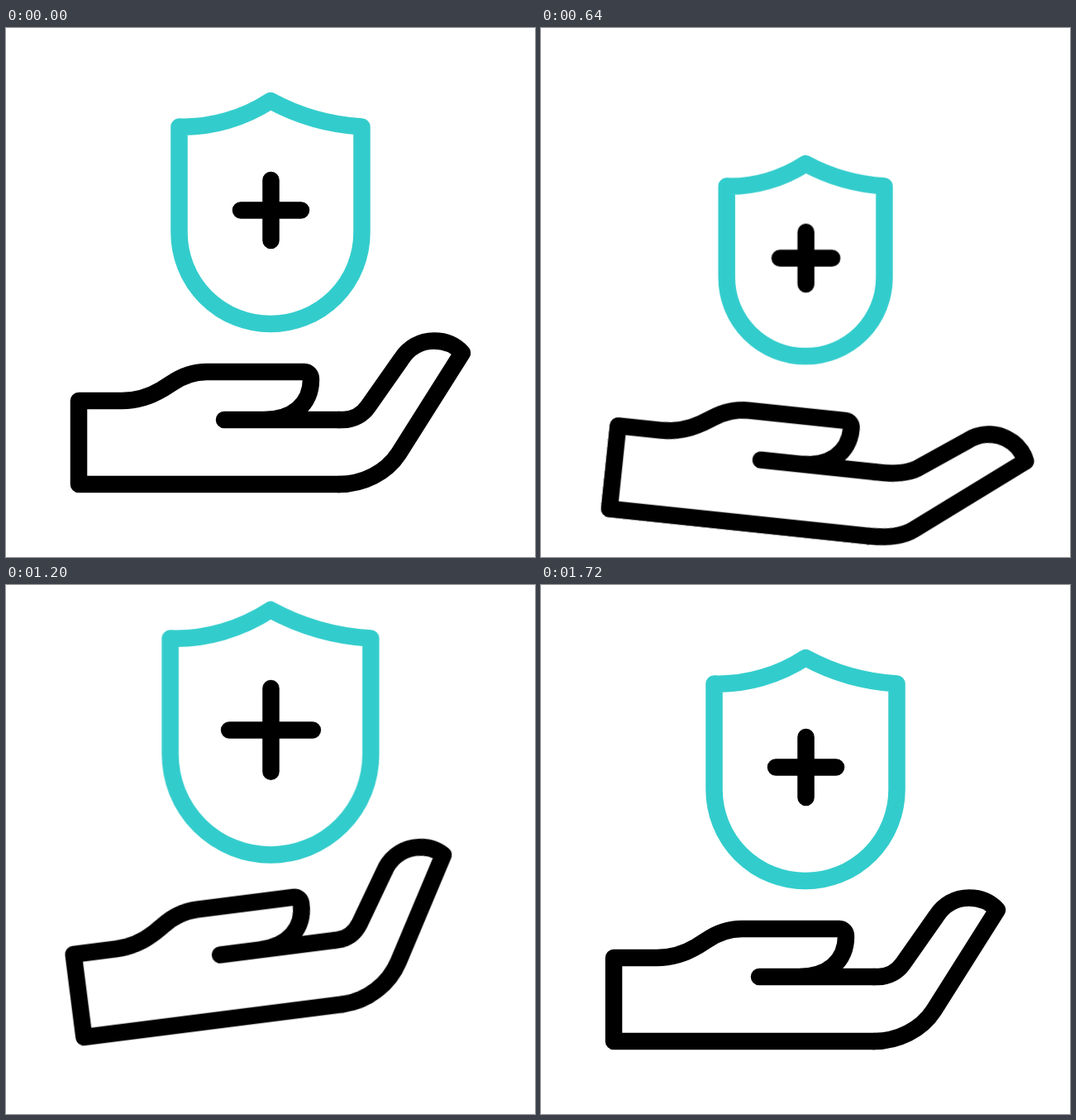
These frames come from a looping animation (640 by 640 pixels, 1.84 s). An HTML page without scripts:

```html
<!DOCTYPE html>
<html lang="en">
<head>
<meta charset="utf-8">
<title>Hand holding a health shield</title>
<style>
  html, body { margin: 0; width: 100%; height: 100%; overflow: hidden; background: #fff; }
  svg { display: block; width: 100%; height: 100%; }
  path {
    fill: none;
    stroke: #000;
    stroke-width: 20.5;
    stroke-linecap: round;
    stroke-linejoin: round;
  }
  .shield { stroke: #33cccc; }

  .hand, .finger, .lift, .shield, .plus {
    animation: 1840ms cubic-bezier(.333, 0, .667, 1) infinite;
  }
  .hand { animation-name: tilt; transform-origin: 88px 501.5px; }
  .finger { animation-name: bend; }
  .lift { animation-name: toss; }
  .shield, .plus { vector-effect: non-scaling-stroke; transform-origin: 320.5px 220.5px; }
  .shield { animation-name: swell; transform-origin: 320px 220.5px; }
  .plus { animation-name: pulse; }

  @keyframes tilt {
    0%, 2.17%, 93.48%, 100% { transform: translateY(0) rotate(0deg); }
    30%, 35.43% { transform: translateY(30px) rotate(6deg); }
    58.7% { transform: translateY(-5px) rotate(-8deg); }
  }
  @keyframes toss {
    0%, 10.87%, 93.48%, 100% { transform: translateY(0); }
    30.43%, 39.13% { transform: translateY(58px); }
    63.7%, 66.09% { transform: translateY(-45px); }
  }
  @keyframes swell {
    0%, 17.39%, 93.48%, 100% { transform: scale(1); }
    38.7%, 39.78% { transform: scale(.85); }
    56.96%, 58.7% { transform: scale(1.108); }
  }
  @keyframes pulse {
    0%, 17.39%, 93.48%, 100% { transform: scale(1); }
    38.7%, 39.78% { transform: scale(.85); }
    56.96%, 58.7% { transform: scale(1.42); }
  }
  /* The half-bent pose keeps the finger on its arc; the split easings join smoothly there. */
  @keyframes bend {
    0%, 11.96%, 76.09%, 100% {
      d: path("M403 474L408 474C420 474 431 468 438 458L478 401C487 387 501 378.5 518 378.5C531 378.5 543 383 552 393L475 515C460 538 432 552 403 552");
      animation-timing-function: cubic-bezier(.333, 0, .667, .5);
    }
    20.65%, 42.3% {
      d: path("M403 474L411 474C423 474 438.3 469 445.8 461.8L497.1 412.3C507.5 401 524 394.6 540.7 397.8C553.4 400.3 564.4 407 571.3 418.5L466 529.5C452 544 427 552 403 552");
      animation-timing-function: cubic-bezier(.333, .5, .667, 1);
    }
    29.35%, 30.43% {
      d: path("M403 474L414 474C426 474 445 471.5 455 465.2L513.8 427C526.1 417.9 543.5 414.8 559.3 421.1C571.3 426 580.8 434.7 585.4 447.3L455 540.3C445 547.4 428 552 403 552");
      animation-timing-function: cubic-bezier(.333, 0, .667, .5);
    }
    56.96% {
      d: path("M403 474L406 474C418 474 428 468 434.8 457.3L470.6 397.8C477.6 384.3 491.9 373.8 508.9 372.6C521.9 371.7 534.1 375.3 543.8 384.7L478 505.9C464 531.7 436 552 403 552");
    }
  }
</style>
</head>
<body>
<svg viewBox="0 0 640 640" role="img" aria-label="Hand holding a health shield">
  <g class="hand">
    <path d="M403 552H88V451H140C158 451 174 446 189 437L200 430C213 421 228 416 243 416H361C365.5 416 369 420 369 425C369 455 347 474 312 474M264 474H403"/>
    <path class="finger" d="M403 474L408 474C420 474 431 468 438 458L478 401C487 387 501 378.5 518 378.5C531 378.5 543 383 552 393L475 515C460 538 432 552 403 552"/>
  </g>
  <g class="lift">
    <path class="shield" d="M209.5 119.5C248 121 288 109 320 88C353 106 390 117 430.5 119.5V247.5A110.5 110.5 0 0 1 209.5 247.5Z"/>
    <path class="plus" d="M284 220.5H357M320.5 184V257"/>
  </g>
</svg>
</body>
</html>
```
